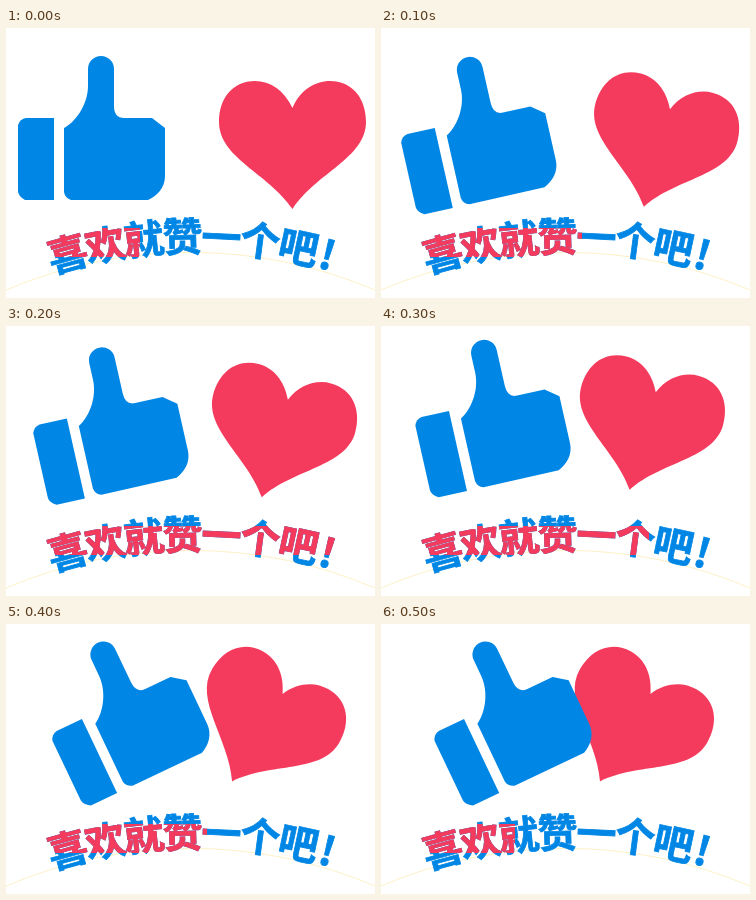
Recreate the animation shown at these times as an HTML page. Size 369x270 px, loop 600 ms.

```html
<!DOCTYPE html>
<html lang="zh">
<head>
<meta charset="utf-8">
<style>
html, body { margin: 0; height: 100%; overflow: hidden; background: #fff; }
svg { display: block; width: 100%; height: 100%; }
text {
  font: 900 40px "Noto Sans CJK SC", "Noto Sans CJK", sans-serif;
  letter-spacing: -2.3px;
  fill: currentColor; stroke: currentColor; stroke-width: .8px;
}
.blue { color: #0086e5; fill: #0086e5; }
.red { color: #f53b5d; fill: #f53b5d; }
</style>
</head>
<body>
<svg viewBox="0 0 369 270">
  <defs>
    <path id="arc" d="M-10 268A471 471 0 0 1 390 268"/>
    <text id="slogan" text-anchor="middle"><textPath href="#arc" startOffset="48.6%">喜欢就赞一个吧<tspan dx="4">!</tspan></textPath></text>
    <clipPath id="tint"><rect id="band" y="200" height="29"/></clipPath>
  </defs>
  <path d="M0 262A471 471 0 0 1 369 262" fill="none" stroke="#fdf1c6"/>
  <path id="heart" class="red" d="M286.5 80C278 62 264 53 249 53C227 53 213 70 213 94C213 130 262 145 286.5 181C310 145 360 130 360 94C360 70 346 53 324 53C309 53 294 62 286.5 80Z"/>
  <g id="thumb" class="blue">
    <path d="M20 90H48V172H19Q12 168 12 163V97Q14 91 20 90Z"/>
    <path d="M58 100C68 95 82 78 82 58V41A13 13 0 0 1 108 41V78Q108 90 118 90H146L159 100V148C159 160 151 168 142 172H65Q59 170 58 164Z"/>
  </g>
  <use href="#slogan" class="blue"/>
  <g clip-path="url(#tint)"><use href="#slogan" class="red"/></g>
</svg>
<script>
const STEP = 100, COUNT = 6, DRIFT = 7.1, CLIMB = 7.5;
const get = id => document.getElementById(id);

// Slide by (x, y) after turning about the shape's own pivot.
function place(id, x, y, angle, pivot) {
  get(id).setAttribute("transform", `translate(${x} ${y}) rotate(${angle} ${pivot})`);
}

function draw(now) {
  const i = Math.floor(now / STEP) % COUNT;
  const swing = Math.floor((i + 2) / 3);
  const y = -CLIMB * Math.max(0, Math.min(i - 1, 2));
  place("thumb", DRIFT * i, y, -12.7 * swing, "92 101");
  place("heart", -DRIFT * i, y, 15 * swing, "286.5 117");
  // The red band spreads along the text, then shrinks back one and a half letters at a time.
  get("band").setAttribute("width", 67 * (i < 2 ? i + 2 : 7 - i));
  requestAnimationFrame(draw);
}
draw(performance.now());
</script>
</body>
</html>
```
